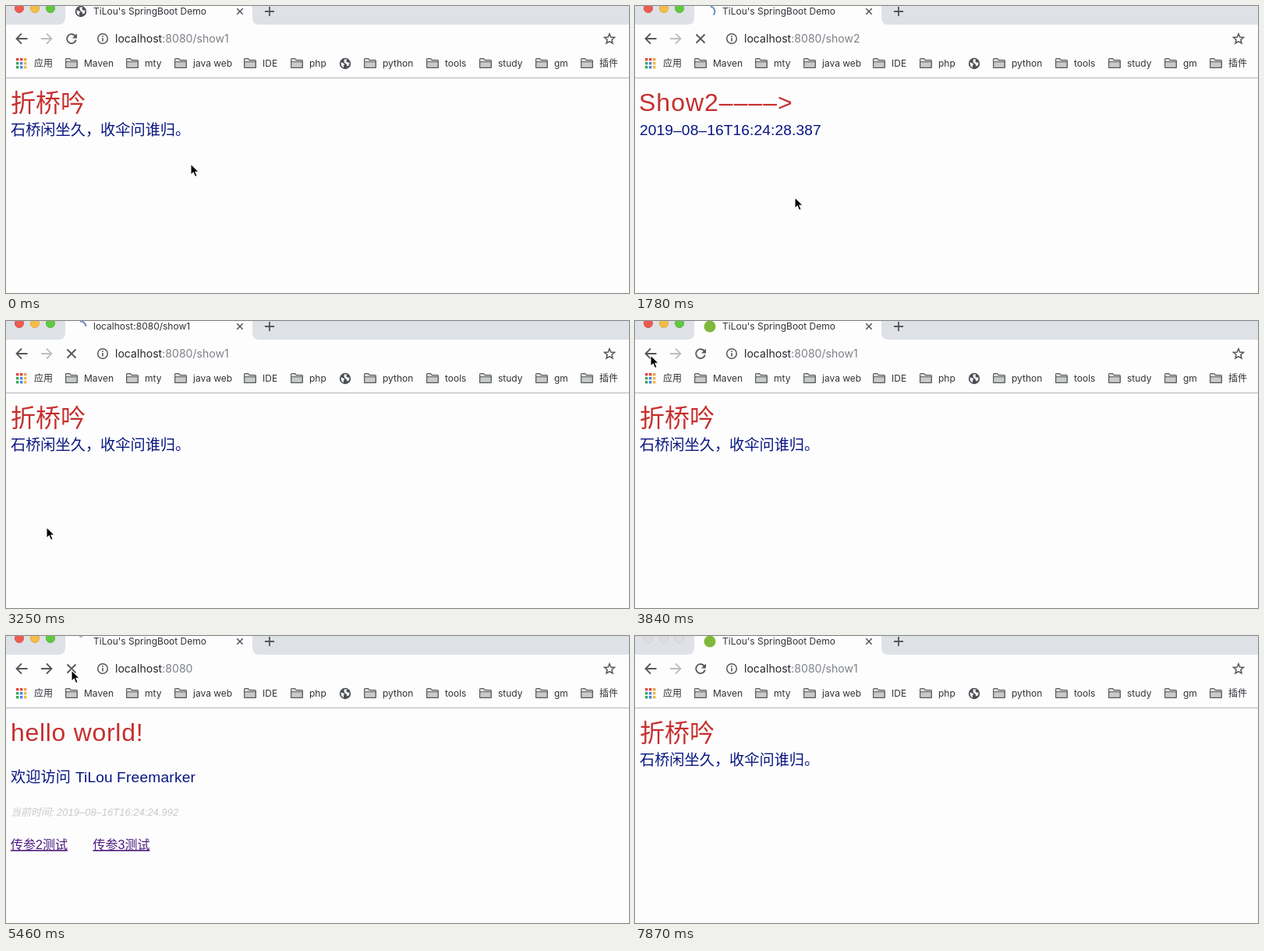
Recreate the animation shown at these times as an HTML page. Size 799 by 369 pixels, loop 7.97 s.

```html
<!DOCTYPE html>
<html lang="zh-CN">
<head>
<meta charset="utf-8">
<title>Browser demo</title>
<style>
html, body { margin: 0; width: 100%; height: 100%; overflow: hidden; background: #fdfdfe; }
svg { display: block; width: 799px; height: 369px; }
text { white-space: pre; }
.ui { font-family: Inter, "Noto Sans CJK SC", sans-serif; font-size: 12px; fill: #303236; }
.url { font-size: 14.1px; fill: #25272a; }
.dim { fill: #7d8186; }
.page { font-family: "Liberation Sans", "Noto Sans CJK SC", sans-serif; }
.h1 { font-size: 32px; fill: #c5302e; }
.p { font-size: 19.2px; fill: #07157f; letter-spacing: .1px; }
.time { font-size: 13px; font-style: italic; fill: #c9c9c9; }
.link { font-size: 16px; fill: #4b1a7d; text-decoration: underline; }
.line { fill: none; stroke: #54575b; stroke-width: 1.8; }
.spinner { fill: none; stroke-width: 2; }
</style>
</head>
<body>
<svg viewBox="0 0 799 369">
  <defs>
    <g id="globe">
      <circle r="7.2" fill="#4b4e53"/>
      <path d="M-5.6-1.5L-2.5-.8-.6 1.2-2.2 2.6-1.8 5.6-4.8 3.2ZM-1.5-5.6L2.6-5.4 1.2-3 3.4-1.2 5.6-1.4 5 2.2 2.4 3.6 1.6.8-1.2-1.2Z" fill="#f4f5f6"/>
    </g>
    <g id="folder" stroke="#55585b" stroke-width="1.1">
      <path d="M.6 11.4V1.6Q.6.6 1.6.6H5.6L7.4 2.6H14.4Q15.4 2.6 15.4 3.6V11.4Q15.4 12.4 14.4 12.4H1.6Q.6 12.4.6 11.4Z" fill="#e3e3e3"/>
      <path d="M.8 4.7H15.2V11.4Q15.2 12.4 14.4 12.4H1.6Q.6 12.4.6 11.4Z" fill="#c9caca"/>
    </g>
  </defs>

  <rect width="799" height="369" fill="#fdfdfe"/>
  <rect width="799" height="24" fill="#dee1e6"/>
  <path d="M67 24Q76 24 76 15V0H316V15Q316 24 325 24Z" fill="#fdfdfe"/>
  <g id="lights"></g>
  <text id="title" class="ui" x="112" y="11"></text>
  <use id="globeIcon" href="#globe" x="96" y="7"/>
  <circle id="leafIcon" cx="96" cy="7" r="7.5" fill="#80b83c"/>
  <path id="wait" class="spinner" stroke="#a3a6ab" d="M94.2.8Q96 .2 98 .8"/>
  <path id="spin" class="spinner" stroke="#6c8fc4" d="M97 .6A6.5 6.5 0 0 1 100.4 11.6"/>
  <path class="line" style="stroke-width:1.6" d="M296.3 3.3L303.7 10.7M303.7 3.3L296.3 10.7"/>
  <path class="line" d="M332 7H344M338 1V13"/>

  <path class="line" d="M27.5 42H14M20 35.5L13.5 42 20 48.5"/>
  <path id="forward" class="line" d="M45 42H58.5M52 35.5L58.5 42 52 48.5"/>
  <g id="reload">
    <path class="line" d="M89.2 39.2A5.9 5.9 0 1 0 89.8 43.5"/>
    <path d="M91 35.4V41.4H85Z" fill="#54575b"/>
  </g>
  <path id="stop" class="line" d="M78.5 36.5L89.5 47.5M89.5 36.5L78.5 47.5"/>
  <circle class="line" style="stroke-width:1.5" cx="124" cy="42" r="6.3"/>
  <path class="line" style="stroke-width:1.6" d="M124 41V45.6M124 38.3V39.9"/>
  <text class="ui url" x="140" y="47">localhost<tspan class="dim" id="path"></tspan></text>
  <path class="line" style="stroke-width:1.5" d="M774 35.7L775.8 40 780.5 40.4 776.9 43.5 778 48 774 45.6 770 48 771.1 43.5 767.5 40.4 772.2 40Z"/>
  <g id="bookmarks"></g>
  <rect y="92" width="799" height="1" fill="#b3b4b6"/>

  <g id="show1" class="page">
    <text class="h1" x="6" y="136">折桥吟</text>
    <text class="p" x="6" y="166" style="letter-spacing:0">石桥闲坐久，收伞问谁归。</text>
  </g>
  <g id="show2" class="page">
    <text class="h1" x="5" y="135" style="letter-spacing:1px">Show2––––&gt;</text>
    <text class="p" x="6" y="166">2019–08–16T16:24:28.387</text>
  </g>
  <g id="home" class="page">
    <text class="h1" x="6" y="135" style="letter-spacing:.7px">hello world!</text>
    <text class="p" x="6" y="188">欢迎访问</text>
    <text class="p" x="89" y="188">TiLou</text>
    <text class="p" x="142" y="188" style="letter-spacing:.2px">Freemarker</text>
    <text class="time" x="6" y="231">当前时间:</text>
    <text class="time" x="65" y="231">2019–08–16T16:24:<tspan id="secs"></tspan></text>
    <text class="link" x="6" y="274">传参2测试</text>
    <text class="link" x="111.5" y="274">传参3测试</text>
  </g>

  <path id="arrow" d="M0 0V14.2L3.3 11.2 5.6 16.6 8.2 15.5 5.9 10.3H10.4Z" fill="#000" stroke="#fff" stroke-width="1.1"/>
  <path id="hand" d="M-1 1Q0-.8 1.3 1L3 6.2 4.6 5.6 6 6.6 7.4 6.2 8.6 7.4 10 7.4Q11 10 10.2 12.6L9.2 17H2.4L1.6 15-2.8 10.8Q-4-.4 9-4.2 8.2Q-3 7.8-1 9.6L.8 10.4Z" fill="#fff" stroke="#111" stroke-width="1.1" stroke-linejoin="round"/>
</svg>
<script>
const LOOP = 7970, STEP = 147.5, BLUR_AT = 7870, PALE_STEP = 30;
const SITE = "TiLou's SpringBoot Demo";
const $ = id => document.getElementById(id);
const show = (id, on) => { $(id).style.display = on ? "" : "none"; };

// step, page, path, icon, plain address as title
const states = [
  [0, "show1", "/show1", "globeIcon"],
  [3, "show1", "", "wait"],
  [5, "home", "", "spin"],
  [6, "home", "", "leafIcon"],
  [10, "home", "", "wait"],
  [11, "show2", "/show2", "spin", true],
  [12, "show2", "/show2", "spin"],
  [13, "show2", "/show2", "globeIcon"],
  [16, "show2", "", "wait"],
  [18, "home", "", "spin"],
  [19, "home", "", "leafIcon"],
  [20, "home", "", "wait"],
  [21, "show1", "/show1", "spin", true],
  [23, "show1", "/show1", "spin"],
  [24, "show1", "/show1", "leafIcon"],
  [27, "show1", "", "wait"],
  [28, "home", "", "spin"],
  [29, "home", "", "leafIcon"],
  [37, "home", "", "wait"],
  [39, "home", "", "spin"],
  [40, "home", "", "leafIcon"],
  [44, "home", "", "wait"],
  [46, "show1", "/show1", "leafIcon"]
];
const RELOADED = 39;

// step, x, y of the pointer tip
const moves = [
  [0, 237, 203], [1, 150, 130], [2, 24, 46], [3, 50, 110], [4, 122, 193],
  [6, 150, 264], [10, 150, 266], [12, 205, 246], [13, 150, 170], [15, 22, 44],
  [16, 22, 44], [19, 44, 262], [22, 52, 265], [23, 52, 265], [25, 24, 60],
  [26, 20, 44], [27, 20, 44], [30, 160, 230], [31, 215, 222], [32, 248, 216],
  [34, 130, 90], [35, 84, 44], [38, 84, 44], [39, 82, 100], [41, 77, 262],
  [45, 77, 262], [46, 191, 243], [48, 450, 330], [50, 712, 355], [51, 730, 390]
];

function pointerAt(step) {
  const next = moves.findIndex(m => m[0] > step);
  if (next < 0) return moves[moves.length - 1].slice(1);
  const [s0, x0, y0] = moves[next - 1], [s1, x1, y1] = moves[next];
  const k = (step - s0) / (s1 - s0);
  return [Math.round(x0 + (x1 - x0) * k), Math.round(y0 + (y1 - y0) * k)];
}

function buildBookmarks() {
  const folders = [[76, "Maven"], [154, "mty"], [216, "java web"], [305, "IDE"], [365, "php"],
    [459, "python"], [539, "tools"], [607, "study"], [679, "gm"], [737, "插件"]];
  const dots = ["#e3453a", "#e3453a", "#e9a23b", "#3aa757", "#4584e8", "#f0b93a", "#3aa757", "#4584e8", "#f0b93a"];
  $("bookmarks").innerHTML =
    dots.map((c, i) => `<rect x="${13 + i % 3 * 5}" y="${67 + Math.floor(i / 3) * 5}" width="3.4" height="3.4" fill="${c}"/>`).join("") +
    `<text class="ui" x="36" y="78">应用</text><use href="#globe" x="435" y="74"/>` +
    folders.map(([x, name]) => `<use href="#folder" x="${x}" y="67"/><text class="ui" x="${x + 24}" y="78">${name}</text>`).join("");
}

function drawLights(active) {
  const fills = active ? ["#ee5b52", "#f5bd45", "#61c93f"] : ["#dcdddf", "#dcdddf", "#dcdddf"];
  const edges = active ? ["#d9483f", "#dda434", "#4cb02c"] : ["#c9cacc", "#c9cacc", "#c9cacc"];
  $("lights").innerHTML = fills.map((c, i) =>
    `<circle cx="${17 + i * 20}" cy="3" r="5.6" fill="${c}" stroke="${edges[i]}" stroke-width=".8"/>`).join("");
}

function draw(step, active) {
  const [, page, path, icon, bare] = states.filter(s => s[0] <= step).pop();
  const loading = icon === "wait" || icon === "spin";
  for (const id of ["show1", "show2", "home"]) show(id, id === page);
  for (const id of ["globeIcon", "leafIcon", "wait", "spin"]) show(id, id === icon);
  show("reload", !loading);
  show("stop", loading);
  $("spin").setAttribute("d", bare ? "M95 .6A6.5 6.5 0 0 1 102.4 7" : "M97 .6A6.5 6.5 0 0 1 100.4 11.6");
  $("forward").style.stroke = path ? "#bcbec1" : "";
  $("path").textContent = ":8080" + path;
  $("title").textContent = bare ? "localhost:8080" + path : SITE;
  $("secs").textContent = step < RELOADED ? "24.992" : "32.551";

  const [x, y] = pointerAt(step);
  const onLink = page === "home" && y > 255 && y < 280 && (x < 81 || (x > 111 && x < 186));
  const pale = step === PALE_STEP;
  show("arrow", !onLink);
  show("hand", onLink);
  $("arrow").setAttribute("fill", pale ? "#d6d6d8" : "#000");
  $(onLink ? "hand" : "arrow").setAttribute("transform", `translate(${x} ${y})`);
  drawLights(active);
}

let last = "";
function tick() {
  const t = performance.now() % LOOP;
  const step = Math.floor((t + 6) / STEP), active = t < BLUR_AT;
  const key = step + "/" + active;
  if (key !== last) draw(step, active);
  last = key;
  requestAnimationFrame(tick);
}

buildBookmarks();
tick();
</script>
</body>
</html>
```
